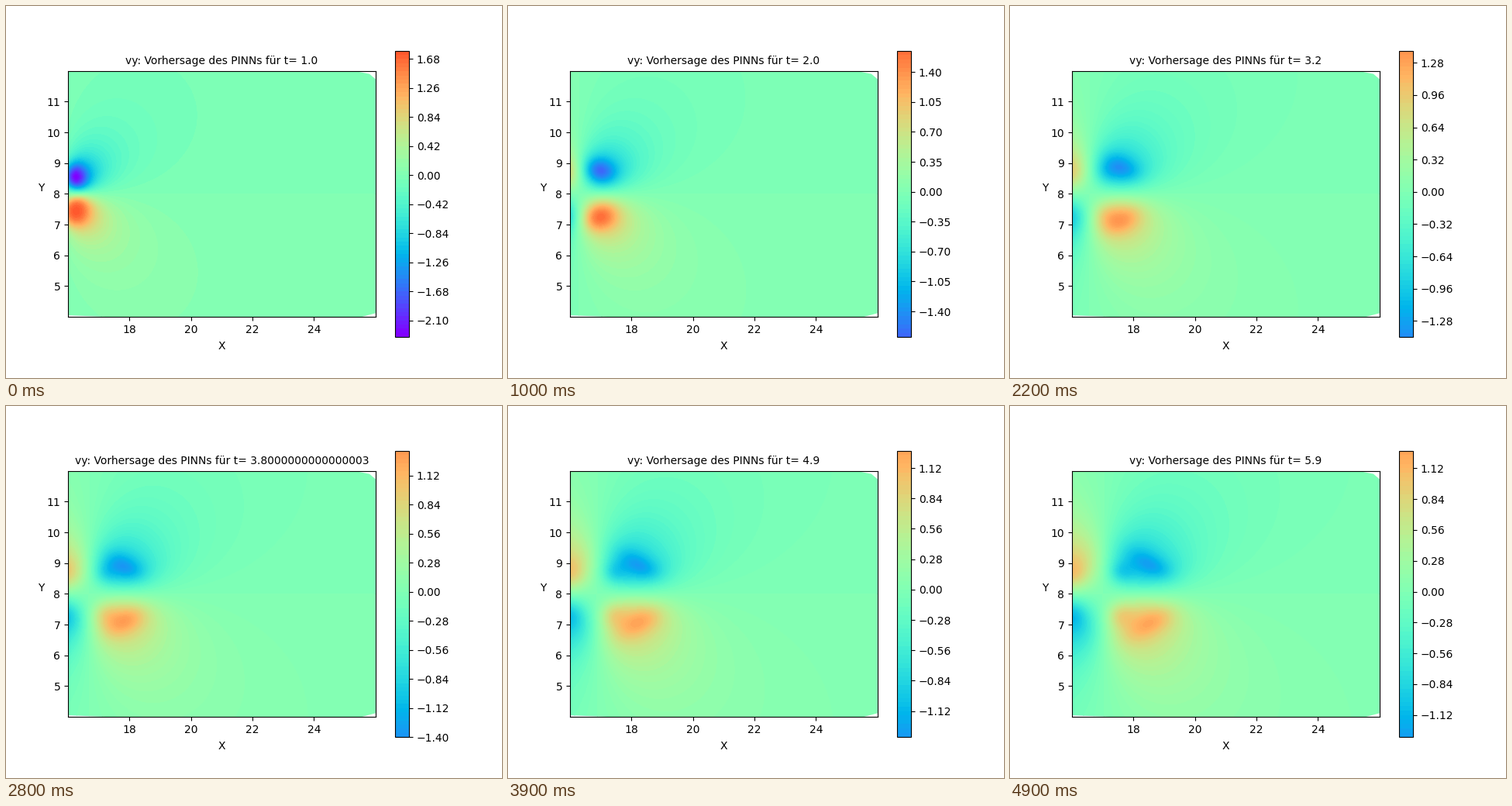
Animation, 640 px wide and 480 px high, one loop 5 s. Source, as a matplotlib script:

```python
import numpy as np
import matplotlib.pyplot as plt
from matplotlib.animation import FuncAnimation
from matplotlib.patches import Polygon

FRAMES = 50
V_LIMIT = 2.3
AXIS_Y = 8.0
X_MIN, X_MAX, Y_MIN, Y_MAX = 16.001, 25.999, 4.001, 11.999

x, y = np.meshgrid(np.linspace(X_MIN, X_MAX, 180), np.linspace(Y_MIN, Y_MAX, 144))

# Outline of the sampled region, with its cut corners
HULL = [(X_MIN, 11.98), (16.4, Y_MAX), (25.3, Y_MAX), (25.8, 11.9), (X_MAX, 11.73),
        (X_MAX, 4.12), (25.55, Y_MIN), (17.3, Y_MIN), (X_MIN, 4.05)]


def squared_distance(dx, dy, sx, sy):
    return (dx / sx) ** 2 + (dy / sy) ** 2


def bump(dx, dy, sx, sy):
    return np.exp(-0.5 * squared_distance(dx, dy, sx, sy))


def lobe(u, age, grown, center):
    """Local structures on one side of the axis, at signed distance u from it."""
    dx = x - 16.22 - 0.8 * age**0.68
    core = (0.7 - 0.45 * grown) * bump(
        dx, u - 0.65 - 0.36 * grown + 0.5 * grown * dx, 0.25 + 0.23 * grown, 0.27)
    halo = 0.45 * grown / (1 + squared_distance(dx - 0.35, u - 0.75, 1.2, 0.8)) ** 2
    shoulder = 0.4 * grown * bump(x - center - 0.5, u - 0.68, 0.28, 0.27)
    inflow = 0.4 * grown * bump(x - 16, u - 0.65, 0.33, 0.33)
    return core + halo + shoulder - inflow


def velocity(age):
    grown = 1 - np.exp(-age / 2.2)
    center = 15.8 + 0.49 * age**0.6
    strength, radius = 3.6 + 0.92 * age, 0.7 + 0.9 * grown
    low = -1.307 - 1.01 * np.exp(-age / 1.05)
    high = 1.25 + 0.97 * np.exp(-age / 1.12) - 0.45 * np.exp(-age / 0.15)

    dx, u = x - center, AXIS_Y - y
    dipole = strength * dx * u / ((dx**2 + u**2) ** 2 + radius**4)
    v = dipole + lobe(u, age, grown, center) - lobe(-u, age, grown, center)
    # Adjust the extremes while leaving the weak outer field alone
    peak = np.where(v > 0, v.max(), v.min())
    goal = np.where(v > 0, high, low)
    return v * (1 + (goal / peak - 1) * (v / peak) ** 2)


fig = plt.figure(figsize=(6.4, 4.8), dpi=100)


def draw(frame):
    fig.clf()
    ax = fig.add_subplot()
    field = velocity(0.1 * min(frame, FRAMES - 2))
    contours = ax.contourf(x, y, field, 80, cmap="rainbow", vmin=-V_LIMIT, vmax=V_LIMIT)
    contours.set_clip_path(Polygon(HULL, transform=ax.transData))
    ax.set_aspect("equal")
    ax.set_title(f"vy: Vorhersage des PINNs für t= {1 + 0.1 * frame}", fontsize=10)
    ax.set_xlabel("X", labelpad=5)
    ax.set_ylabel("Y", rotation=0, labelpad=5)
    fig.colorbar(contours, ax=ax)
    return []


anim = FuncAnimation(fig, draw, frames=FRAMES, init_func=lambda: [], interval=100, repeat=True,
                     repeat_delay=0)
plt.show()
```
